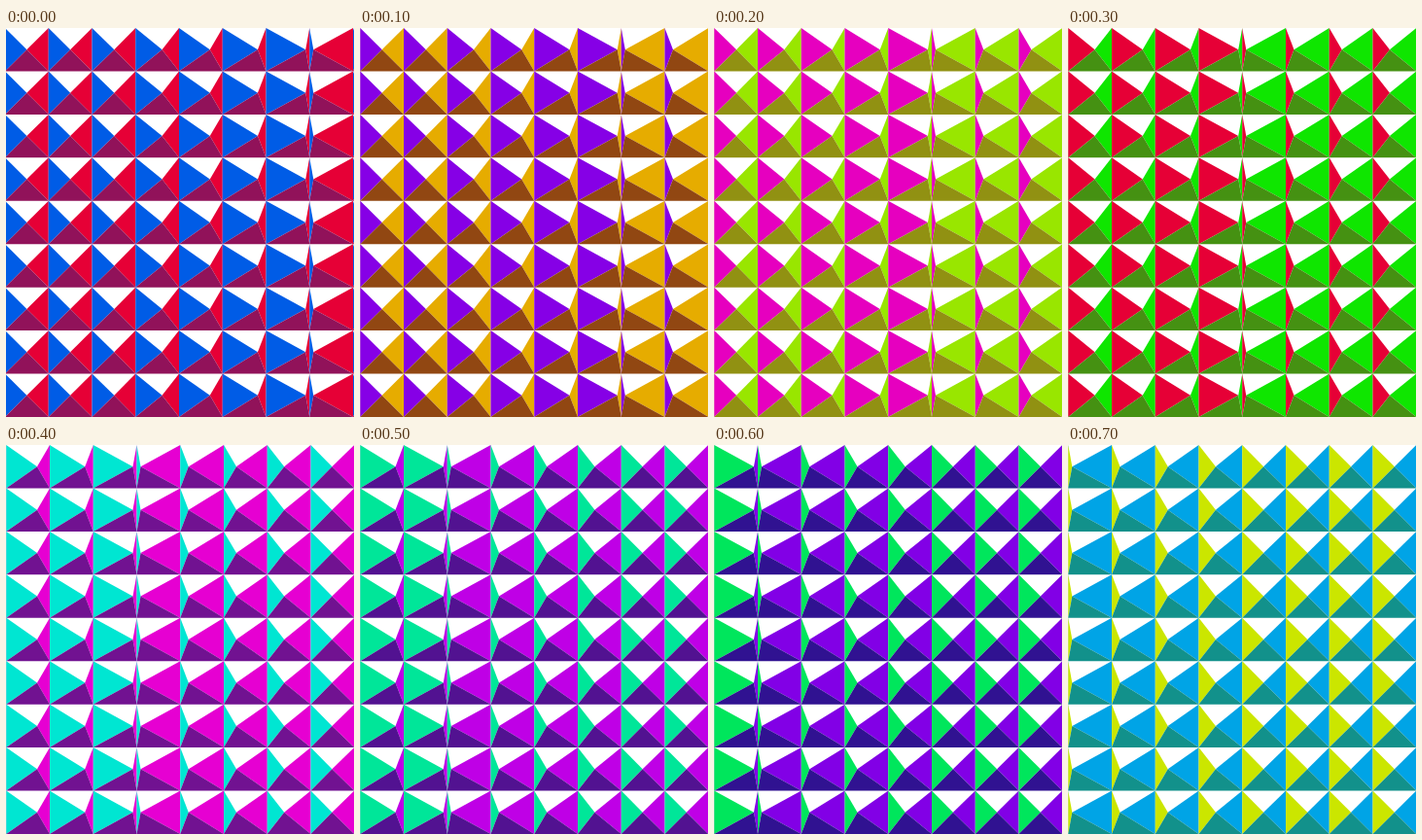
Write an HTML page with a canvas that moves like this. It is 358x400 px and loops after 0.8 s.

```html
<!DOCTYPE html>
<html lang="en">
<head>
<meta charset="utf-8">
<title>Pyramid wave</title>
<style>
html, body { margin: 0; width: 100%; height: 100%; overflow: hidden; background: #fff; }
canvas { display: block; width: 358px; height: 400px; }
</style>
</head>
<body>
<canvas id="stage" width="358" height="400"></canvas>
<script>
const ctx = document.getElementById('stage').getContext('2d');
const W = 358, H = 400, COLS = 8, ROWS = 9, STEP = 100;
const cw = W / COLS, ch = H / ROWS;

// Hue of the left face at each step; the other faces follow from it.
const hues = [216, 275, 310, 346, 175, 160, 144, 67];

// Horizontal place of the peak inside a cell, 0 to 1:
// it leans linearly towards the wave front and rests in the middle far away.
function peak(s) {
  const u = s - 6.5;
  const pull = Math.max(0, 0.92 - 0.2 * Math.abs(u));
  return 0.5 - Math.sign(u) * pull / 2;
}

function tri(color, ...p) {
  ctx.fillStyle = color;
  ctx.beginPath();
  ctx.moveTo(p[0], p[1]);
  ctx.lineTo(p[2], p[3]);
  ctx.lineTo(p[4], p[5]);
  ctx.fill();
}

function draw(step) {
  const hue = hues[step];
  const left = `hsl(${hue}, 100%, 45%)`;
  const right = `hsl(${(hue + 130) % 360}, 100%, 45%)`;
  const base = `hsl(${(hue + 110) % 360}, 78%, 32%)`;
  const shift = step ? 0.25 : -1;

  ctx.fillStyle = '#fff';
  ctx.fillRect(0, 0, W, H);
  for (let c = -1; c <= COLS; c++) {
    const x = c * cw + shift, x2 = x + cw;
    const px = x + cw * peak(c + step);
    for (let r = 0; r < ROWS; r++) {
      const y = r * ch, y2 = y + ch, py = y + ch / 2;
      tri(left, x, y, x, y2, px, py);
      tri(right, x2, y, x2, y2, px, py);
      tri(base, x, y2, x2, y2, px, py);
    }
  }
}

let shown = -1;
function tick() {
  const step = Math.floor(performance.now() / STEP) % hues.length;
  if (step !== shown) draw(shown = step);
  requestAnimationFrame(tick);
}
tick();
</script>
</body>
</html>
```
